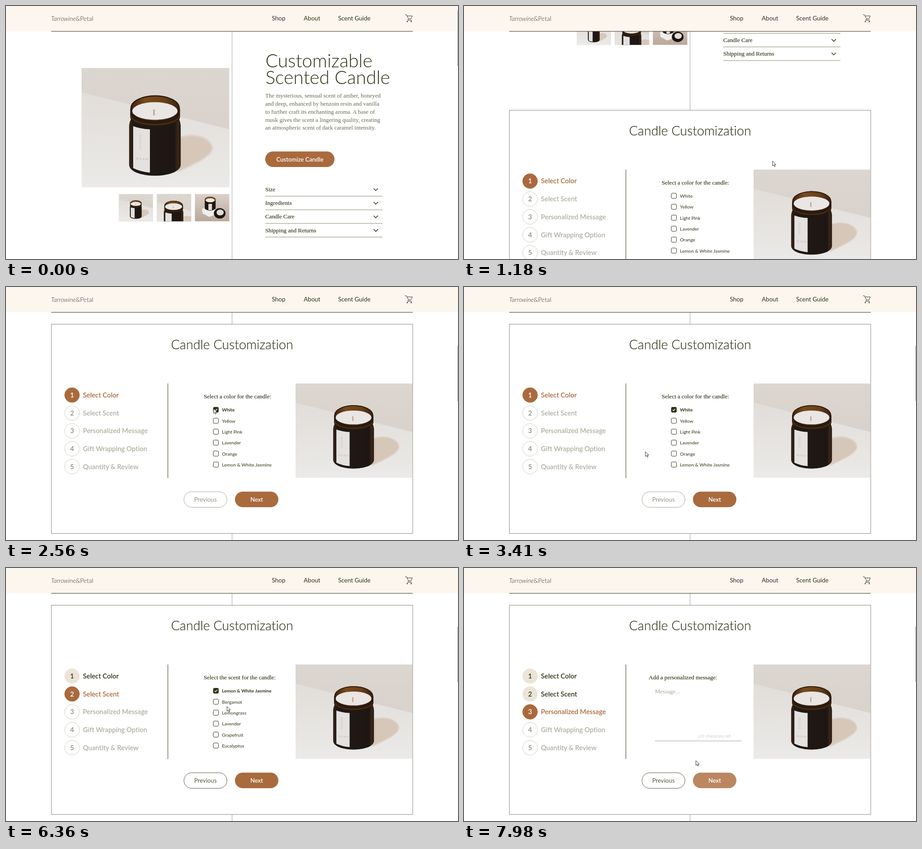
Animation, 999 px wide and 561 px high, one loop 8 s. Source, as an HTML page:

```html
<!DOCTYPE html>
<html lang="en">
<head>
<meta charset="utf-8">
<title>Candle shop</title>
<style>
  html, body { margin: 0; width: 100%; height: 100%; overflow: hidden; background: #fff; }
  svg { display: block; }
  #stage { font: 13.5px Lato, sans-serif; fill: #2f3314; font-variant-ligatures: none; }
  .serif { font: 13px "Liberation Serif", serif; font-variant-ligatures: none; }
  .firm { stroke: #2f3314; stroke-width: .15; }
  .para { fill: #66684f; }
  .title { font-size: 40.8px; font-weight: 300; }
  .heading { font-size: 28.6px; font-weight: 300; stroke: #2f3314; stroke-width: .2; }
  .mid { text-anchor: middle; }
  .step { font-size: 14.8px; font-weight: 600; }
  .opt { font-size: 10.4px; }
  .bold { font-size: 10.2px; font-weight: 700; }
  .btn { font-size: 13.1px; font-weight: 600; fill: #fff; text-anchor: middle; }
  .line { fill: none; stroke: #2f3314; }
</style>
</head>
<body>
<svg id="stage" width="999" height="561" viewBox="0 0 999 561">
  <defs>
    <linearGradient id="wall" x2="0" y2="1">
      <stop stop-color="#dcd6d0"/><stop offset="1" stop-color="#d6cfc8"/>
    </linearGradient>
    <linearGradient id="floor" x2="0" y2="1">
      <stop stop-color="#e1ddd9"/><stop offset="1" stop-color="#ebeae8"/>
    </linearGradient>
    <linearGradient id="shelf" x2="0" y2="1">
      <stop stop-color="#dad0c8"/><stop offset="1" stop-color="#bba79a"/>
    </linearGradient>
    <linearGradient id="glass">
      <stop stop-color="#3a2717"/><stop offset=".08" stop-color="#201916"/>
      <stop offset=".88" stop-color="#1d1613"/><stop offset=".95" stop-color="#3b2818"/><stop offset="1" stop-color="#231812"/>
    </linearGradient>
    <linearGradient id="amber">
      <stop stop-color="#3b2110"/><stop offset=".3" stop-color="#7a4a1d"/>
      <stop offset=".7" stop-color="#68401a"/><stop offset="1" stop-color="#352010"/>
    </linearGradient>
    <filter id="soft"><feGaussianBlur stdDeviation="2"/></filter>
    <symbol id="photo" viewBox="0 0 326.5 264.5">
      <path fill="url(#wall)" d="M0 0h326.5v264.5H0z"/>
      <path fill="url(#floor)" d="M0 54L326.5 136V264.5H0z"/>
      <path fill="#d6c7b9" filter="url(#soft)" d="M212 156C240 143 284 150 289 176C290 196 250 212 212 231z"/>
      <path fill="url(#glass)" d="M105 128Q106 116 112 110H213Q218 116 219 128V214C219 247 105 247 105 214z"/>
      <path fill="#2a1a0f" d="M107.5 90V108C107.5 137 217.5 137 217.5 108V90z"/>
      <path fill="none" stroke="#573517" stroke-width="2" d="M109 106C114 132 211 132 216 106"/>
      <ellipse cx="162.5" cy="89" rx="54.5" ry="28" fill="url(#amber)"/>
      <ellipse cx="162.5" cy="88.5" rx="53" ry="26.5" fill="none" stroke="#2b190d" stroke-width="2.5"/>
      <ellipse cx="162" cy="95.5" rx="50" ry="19.5" fill="#e9e6e4"/>
      <path stroke="#c79b7c" stroke-width="3" d="M160 92v13"/>
      <path fill="#e3e2e1" d="M114 129Q130 135 151 136V232Q130 230 114 222z"/>
      <g fill="#d9b294">
        <text font-size="6" letter-spacing="1" transform="translate(132 181) rotate(-90)">SCENTED</text>
        <text x="119" y="203" font-size="7" letter-spacing="2" transform="rotate(5 119 203)">WARM</text>
      </g>
    </symbol>
  </defs>
  <path stroke="#bdbdbd" stroke-width="1.5" d="M499.6 56V561"/>
  <g id="product"></g>
  <g id="card"></g>
  <g id="header"></g>
  <rect id="thumb" x="998" width="1" height="123" fill="#8c8c8c"/>
  <path id="cursor" fill="#fff" stroke="#222" stroke-width=".9" d="M0 0V10.6L2.5 8.4L4.2 12.2L5.9 11.4L4.2 7.7H7.5z"/>
</svg>
<script>
const $ = id => document.getElementById(id);
const RUST = '#a96a3d', PALE = '#ba8761', HOVER = '#b57a50', DARK = '#2f3314', DIM = '#adaf9f';
const LOOP = 8000, FIRST = 220, TICK = 77.6, SCROLL = 540;

const text = (x, y, s, cls = '', more = '') => `<text x="${x}" y="${y}" class="${cls}" ${more}>${s}</text>`;
const each = (list, f) => list.map(f).join('');
const pill = (x, y, w, more) => `<rect x="${x}" y="${y}" width="${w}" height="34.5" rx="17.2" ${more}/>`;

$('header').innerHTML = `
  <rect width="999" height="56" fill="#fcf6ef"/>
  <path class="line" d="M100 56.2H899"/>
  <text x="99.5" y="32.5" font-size="13.8" font-weight="300"><tspan font-style="italic">Tarrowine</tspan>&amp;Petal</text>
  ${text(587.5, 32, 'Shop')}${text(658, 32, 'About')}${text(734, 32, 'Scent Guide')}
  <path class="line" d="M882 19.5H885L889.8 28.6H895L898 22H886.3M889.8 28.6L887.6 31.6H897"/>
  <circle cx="887" cy="34.6" r="1.3"/><circle cx="895.6" cy="34.6" r="1.3"/>`;

const story = [
  'The mysterious, sensual scent of amber, honeyed',
  'and deep, enhanced by benzoin resin and vanilla',
  'to further craft its enchanting aroma. A base of',
  'musk gives the scent a lingering quality, creating',
  'an atmospheric scent of dark caramel intensity.'];

$('product').innerHTML = `
  <use href="#photo" x="167" y="137.3" width="326.7" height="264.7"/>
  <use href="#photo" x="249" y="416.8" width="76.3" height="61"/>
  <svg x="333.3" y="416.8" width="76" height="60.7" viewBox="64 21 201 160.5" preserveAspectRatio="none">
    <use href="#photo" width="326.5" height="264.5"/></svg>
  <svg x="417.3" y="416.8" width="76.3" height="60.7">
    <path fill="url(#shelf)" d="M0 0H77V61H0z"/>
    <path fill="#f0eeec" d="M16 33L28 28L46 31L45 46L32 51L17 43z"/>
    <path fill="#21160f" d="M22 12H46V33Q34 41 22 33z"/>
    <path fill="#dedbd8" d="M30 22H38V36H30z"/>
    <ellipse cx="34" cy="12" rx="12" ry="6" fill="#6b4420"/>
    <ellipse cx="34" cy="14" rx="10" ry="4.5" fill="#f0e9d8"/>
    <ellipse cx="55" cy="43" rx="13" ry="11.5" fill="#1c1613"/>
    <ellipse cx="56" cy="41" rx="8" ry="6.5" fill="#e2dcd6"/>
  </svg>
  ${text(573.5, 135.5, 'Customizable', 'title')}
  ${text(573.5, 172.5, 'Scented Candle', 'title')}
  ${each(story, (s, i) => text(573, 203.4 + i * 17.7, s, 'serif para'))}
  ${pill(573, 322.5, 153, 'id="customize"')}
  ${text(649.5, 344.7, 'Customize Candle', 'btn')}
  ${each(['Size', 'Ingredients', 'Candle Care', 'Shipping and Returns'], (s, i) => {
    const y = 407 + i * 30.2;
    return text(573, y + 4, s, 'serif firm') +
      `<path stroke="#85876f" d="M573 ${y + 14.7}H832"/>
       <path class="line" stroke-width="1.5" d="M812.5 ${y - 2.5}L817.2 ${y + 2.3}L822 ${y - 2.5}"/>`;
  })}`;

const steps = ['Select Color', 'Select Scent', 'Personalized Message', 'Gift Wrapping Option', 'Quantity &amp; Review'];
const pages = [
  { ask: 'Select a color for the candle:',
    opts: ['White', 'Yellow', 'Light Pink', 'Lavender', 'Orange', 'Lemon &amp; White Jasmine'] },
  { ask: 'Select the scent for the candle:',
    opts: ['Lemon &amp; White Jasmine', 'Bergamot', 'Lemongrass', 'Lavender', 'Grapefruit', 'Eucalyptus'] },
  {}];

function step(name, i, now) {
  const y = 239.6 + i * 39.7;
  const [fill, ring, num, ink] = i < now ? ['#ece4d6', '#ece4d6', DARK, DARK]
    : i == now ? [RUST, RUST, '#fff', RUST] : ['#fff', '#cfd0c3', '#8b8d78', DIM];
  return `<circle cx="146" cy="${y}" r="16.4" fill="${fill}" stroke="${ring}"/>` +
    text(146, y + 5.2, i + 1, 'step mid', `fill="${num}"`) +
    text(170, y + 5.2, name, 'step', `fill="${ink}"`);
}

function option(name, i, n) {
  const y = 272.2 + i * 24.3;
  const box = fill => `<rect x="458.2" y="${y - 5.7}" width="11.4" height="11.4" rx="2.4" fill="${fill}" stroke="${DARK}"/>`;
  const plain = box('#fff') + text(477.3, y + 4.2, name, 'opt');
  if (i) return plain;
  return `<g id="off${n}">${plain}</g><g id="on${n}">${box(DARK)}
    <path class="line" style="stroke:#fff" stroke-width="1.4" d="M461.2 ${y}L463.2 ${y + 2}L466.8 ${y - 1.8}"/>
    ${text(477.3, y + 4.2, name, 'bold')}</g>`;
}

const message = text(408.3, 247, 'Add a personalized message:', 'serif firm') +
  text(422, 278, 'Message...', 'serif', 'fill="#a3a596"') +
  text(517, 375.5, '120 characters left', '', 'style="font:8.9px Liberation Sans,sans-serif" fill="#cfcfcb"') +
  '<path stroke="#a0a19a" d="M422 383.5H613"/>';

function page({ ask, opts }, n) {
  return `<g id="page${n}">${each(steps, (s, i) => step(s, i, n))}
    ${opts ? text(437, 247, ask, 'serif firm') + each(opts, (s, i) => option(s, i, n)) : message}
    ${pill(393.3, 454, 95, `fill="#fff" stroke="${n ? '#55583f' : '#a5a69a'}"`)}
    ${text(440.8, 475.7, 'Previous', 'mid', `style="font-size:13.2px" fill="${n ? '#55583f' : '#93957f'}"`)}</g>`;
}

$('card').innerHTML = `
  <rect x="100.3" y="82.5" width="798.6" height="464" fill="#fff" stroke="#85857f"/>
  ${text(499.7, 138, 'Candle Customization', 'heading mid')}
  <path class="line" d="M357.8 214V423.5"/>
  <use href="#photo" x="640" y="213.8" width="258.3" height="209.3"/>
  ${each(pages, page)}
  ${pill(506, 453.8, 96, 'id="next"')}
  ${text(554, 475.7, 'Next', 'btn')}`;

// Pointer path: time, x, y
const path = [
  [220, 866, 524], [600, 745, 400], [760, 692, 350], [996, 682, 344], [1151, 682, 344], [1384, 598.5, 363],
  [1600, 505, 318], [1850, 449, 260], [2100, 457, 268], [3105, 461, 272], [3190, 456, 280], [3401, 401, 365],
  [3570, 399, 397], [3712, 418, 423], [3890, 450, 446], [4100, 520, 468], [4340, 552, 464], [4500, 561, 470],
  [4640, 561, 472], [5100, 561, 472], [5400, 515, 380], [5730, 461, 268], [5885, 454, 261], [6045, 456, 264],
  [6200, 464, 276], [6350, 488.5, 307], [6600, 530, 400], [6800, 556, 464], [7045, 552, 471], [7600, 552, 472],
  [7770, 540, 474], [7902, 534, 465], [7980, 512.5, 427]];

function pointer(t) {
  const i = path.findIndex(p => p[0] > t);
  if (i < 0) return path[path.length - 1].slice(1);
  const a = path[Math.max(i - 1, 0)], b = path[i];
  const u = Math.max(0, (t - a[0]) / (b[0] - a[0] || 1));
  return [a[1] + (b[1] - a[1]) * u, a[2] + (b[2] - a[2]) * u];
}

const ramp = (t, start, span = 300) => Math.min(1, Math.max(0, (t - start) / span));
const show = (id, on) => $(id).setAttribute('visibility', on ? 'visible' : 'hidden');

function draw(ms) {
  const t = ms < FIRST - 10 ? 0 : FIRST + TICK * Math.floor((ms - FIRST + 10) / TICK);
  const p = 1 - (1 - ramp(t, 1008.6)) ** 2;
  const [x, y] = pointer(t);
  const over = (l, r, top, bottom) => x > l && x < r && y > top && y < bottom;

  $('product').setAttribute('transform', `translate(0 ${-SCROLL * p})`);
  $('card').setAttribute('transform', `translate(0 ${SCROLL * (1 - p)})`);
  $('thumb').setAttribute('y', 10 + 120 * p);
  show('thumb', p == 0 || p == 1);
  $('cursor').setAttribute('transform', `translate(${x} ${y})`);
  show('cursor', t > 0);

  const second = ramp(t, 4580), third = ramp(t, 7140);
  [1 - second, second * (1 - third), third].forEach((o, i) => $('page' + i).setAttribute('opacity', o));
  // Opacity alone would not hide check marks that set their own visibility.
  [2240, 6040].forEach((at, i) => {
    show('on' + i, t >= at);
    show('off' + i, t < at);
  });

  const ready = t >= 2240 && t < 4600 || t >= 6040 && t < 7190;
  $('next').setAttribute('fill', !ready ? PALE : over(506, 602, 454, 488) ? HOVER : RUST);
  $('customize').setAttribute('fill', t && over(573, 726, 322, 357) ? HOVER : RUST);
}

function loop() {
  draw(performance.now() % LOOP);
  requestAnimationFrame(loop);
}
loop();
</script>
</body>
</html>
```
